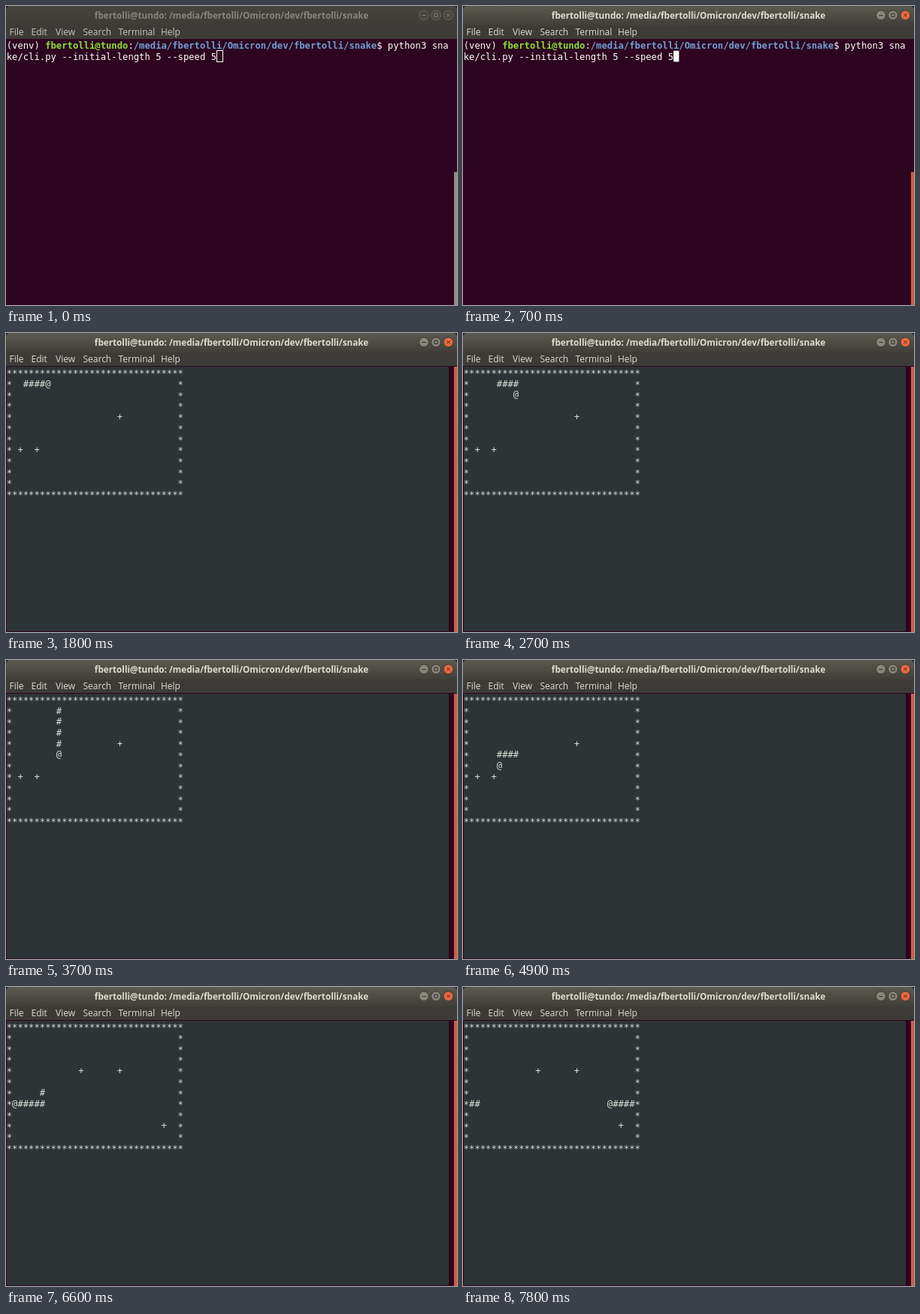
An HTML page with a canvas that plays this animation: 600x399 px, repeating every 8000 ms.

```html
<!DOCTYPE html>
<html lang="en">
<head>
<meta charset="utf-8">
<title>Snake in a terminal</title>
<style>
  html, body { margin: 0; width: 100%; height: 100%; overflow: hidden; background: #2d0520; }
  canvas { display: block; width: 600px; height: 399px; }
</style>
</head>
<body>
<canvas id="stage"></canvas>
<script>
const LOOP = 8000, TICK = 100;
const FOCUS_AT = 700, ENTER_AT = 1500, GAME_AT = 1769;
const STEP = { r: [1, 0, 256], l: [-1, 0, 256], d: [0, 1, 386] };
// Straight runs: direction, time of the first step, number of steps.
const RUNS = [['r', 2025, 2], ['d', 2537, 4], ['l', 4081, 3], ['d', 4849, 2], ['l', 5490, 10]];
const COLS = 32, ROWS = 12;
const CELL_W = 7.35, CELL_H = 14.7, LEFT = 0.7, TOP = 45;

const USER = 'fbertolli', HOST = 'tundo';
const CWD = `/media/${USER}/Omicron/dev/${USER}/snake`;
const MONO = '"DejaVu Sans Mono", monospace';
const SANS = '"Open Sans", "Noto Sans", sans-serif';

const canvas = document.getElementById('stage');
const ctx = canvas.getContext('2d');
const ratio = window.devicePixelRatio || 1;
canvas.width = 600 * ratio;
canvas.height = 399 * ratio;
ctx.scale(ratio, ratio);

function rect(x, y, w, h, color) {
  ctx.fillStyle = color;
  ctx.fillRect(x, y, w, h);
}

function label(text, x, y, font, color, align = 'left') {
  ctx.font = font;
  ctx.fillStyle = color;
  ctx.textAlign = align;
  ctx.fillText(text, x, y);
}

// Writes on the character grid, wrapping at 80 columns.
function write(text, col, row, color = '#fff', bold = false) {
  ctx.font = `${bold ? 'bold ' : ''}12.2px ${MONO}`;
  ctx.fillStyle = color;
  ctx.textAlign = 'left';
  [...text].forEach((ch, i) => {
    const c = (col + i) % 80, r = row + Math.floor((col + i) / 80);
    const drop = ch === '*' ? 1.5 : 0;
    ctx.fillText(ch, LEFT + c * CELL_W, TOP + r * CELL_H + 11.8 + drop);
  });
  return col + text.length;
}

function button(x, kind, focused) {
  const close = kind === 'close' && focused;
  ctx.beginPath();
  ctx.arc(x, 12.2, 6.3, 0, Math.PI * 2);
  ctx.fillStyle = close ? '#ec6a42' : focused ? '#88867c' : '#48463f';
  ctx.fill();
  ctx.lineWidth = 0.8;
  ctx.strokeStyle = focused ? '#34322d' : '#77746a';
  ctx.stroke();
  ctx.strokeStyle = close ? '#4b2518' : focused ? '#2f2e29' : '#858278';
  ctx.lineWidth = 1;
  ctx.beginPath();
  if (kind === 'min') {
    ctx.moveTo(x - 2.5, 12.5);
    ctx.lineTo(x + 2.5, 12.5);
  } else if (kind === 'max') {
    ctx.rect(x - 2.2, 10, 4.4, 4.4);
  } else {
    ctx.moveTo(x - 2.2, 10);
    ctx.lineTo(x + 2.2, 14.4);
    ctx.moveTo(x + 2.2, 10);
    ctx.lineTo(x - 2.2, 14.4);
  }
  ctx.stroke();
}

function drawChrome(focused) {
  const bar = ctx.createLinearGradient(0, 0, 0, 26);
  bar.addColorStop(0, focused ? '#5b5950' : '#45443e');
  bar.addColorStop(1, focused ? '#403e39' : '#3d3c37');
  rect(0, 0, 600, 8, '#1c1b19');
  ctx.fillStyle = bar;
  ctx.beginPath();
  ctx.roundRect(0, 0, 600, 26, [5, 5, 0, 0]);
  ctx.fill();
  rect(0, 26, 600, 18, '#3d3b37');
  label(`${USER}@${HOST}: ${CWD}`, 300, 16.6, `bold 11.7px ${SANS}`,
    focused ? '#dfdbd2' : '#88857b', 'center');
  button(556, 'min', focused);
  button(572, 'max', focused);
  button(588.5, 'close', focused);
  const menu = { File: 4.5, Edit: 33.5, View: 66, Search: 102.5, Terminal: 149.5, Help: 206 };
  for (const name in menu) {
    label(name, menu[name], 39.3, `12px ${SANS}`, focused ? '#dfdbd2' : '#c9c5bc');
  }
}

function drawShell(t, focused) {
  let col = write('(venv) ', 0, 0);
  col = write(`${USER}@${HOST}`, col, 0, '#8ae234', true);
  col = write(':', col, 0);
  col = write(CWD, col, 0, '#729fcf', true);
  col = write('$ python3 snake/cli.py --initial-length 5 --speed 5', col, 0);

  const entered = t >= ENTER_AT;
  const x = LEFT + (entered ? 0 : col - 80) * CELL_W;
  const y = TOP + (entered ? 2 : 1) * CELL_H;
  if (focused) {
    rect(x, y, CELL_W, CELL_H, '#fff');
  } else {
    ctx.strokeStyle = '#fff';
    ctx.lineWidth = 1;
    ctx.strokeRect(Math.floor(x) + 0.5, Math.floor(y) + 0.5, 8, 15);
  }
}

function playTo(t) {
  const snake = [7, 6, 5, 4, 3].map(x => [x, 1]);
  const food = [[20, 4], [2, 7], [5, 7]];
  const spawns = [[13, 4], [28, 9]];
  for (const [dir, start, count] of RUNS) {
    const [dx, dy, delay] = STEP[dir];
    for (let i = 0; i < count && start + i * delay <= t; i++) {
      const [hx, hy] = snake[0];
      const x = (hx - 1 + dx + COLS - 2) % (COLS - 2) + 1, y = hy + dy;
      snake.unshift([x, y]);
      const eaten = food.findIndex(f => f[0] === x && f[1] === y);
      if (eaten >= 0) food[eaten] = spawns.shift();
      else snake.pop();
    }
  }
  return { snake, food };
}

function drawGame(t) {
  const ink = '#dcdfd8';
  rect(1, 45, 588, 353, '#2e3436');
  for (let row = 0; row < ROWS; row++) {
    const edge = row === 0 || row === ROWS - 1;
    write(edge ? '*'.repeat(COLS) : '*' + ' '.repeat(COLS - 2) + '*', 0, row, ink);
  }
  const { snake, food } = playTo(t);
  food.forEach(([x, y]) => write('+', x, y, ink));
  snake.forEach(([x, y], i) => write(i ? '#' : '@', x, y, ink));
}

function draw(t) {
  const focused = t >= FOCUS_AT, playing = t >= GAME_AT;
  rect(0, 0, 600, 399, '#2d0520');
  drawChrome(focused);
  if (playing) drawGame(t);
  else drawShell(t, focused);
  const top = playing ? 45 : 221.5;
  rect(596, top, 4, 399 - top, focused ? '#cf5d3c' : '#918b88');
}

const start = performance.now();
function frame() {
  const t = (performance.now() - start) % LOOP;
  draw(Math.floor(t / TICK) * TICK);
  requestAnimationFrame(frame);
}
frame();
</script>
</body>
</html>
```
